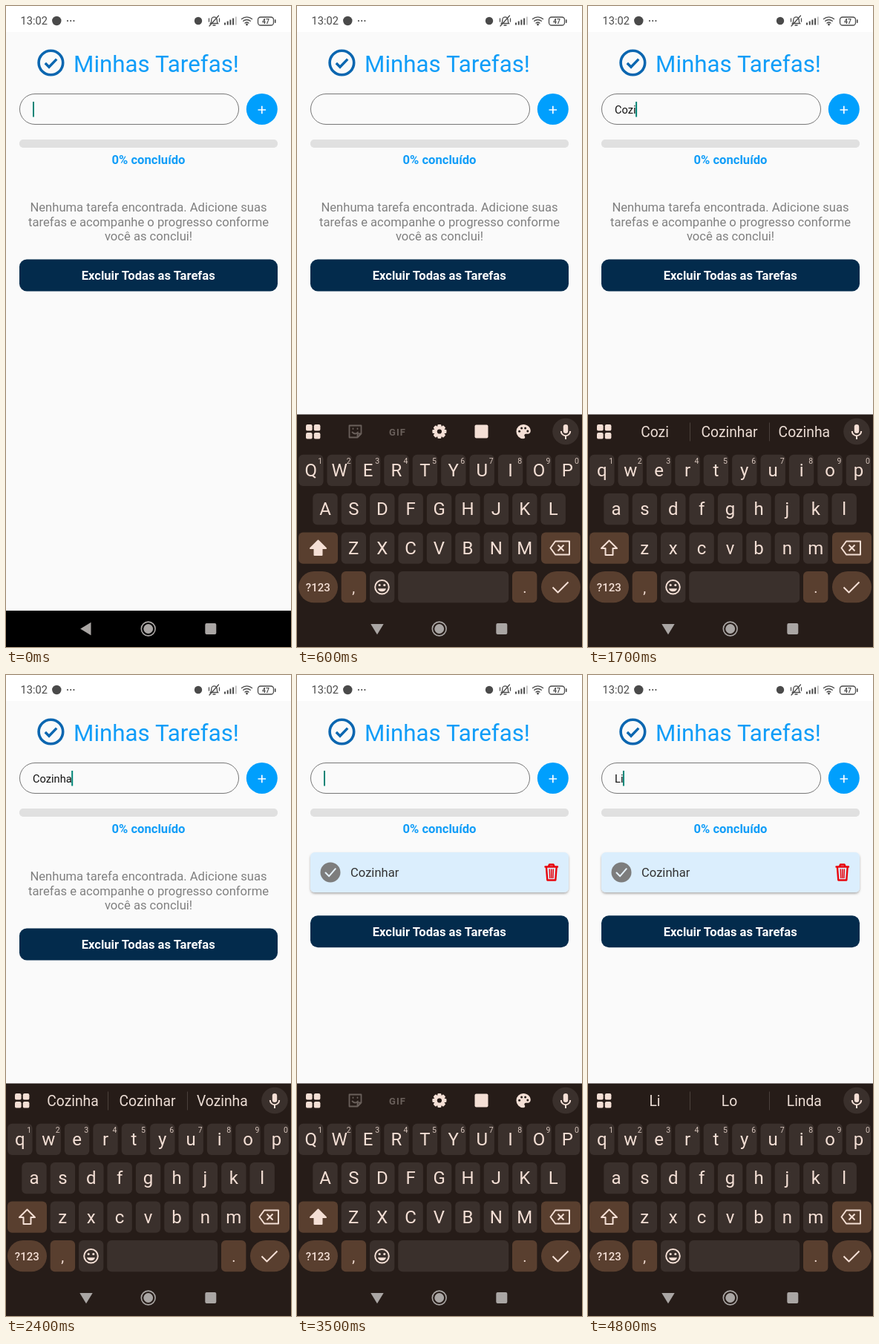
Write an HTML page that moves like this. It is 384x864 px and loops after 5 s.

```html
<!DOCTYPE html>
<html lang="pt-BR">
<head>
<meta charset="utf-8">
<title>Minhas Tarefas</title>
<style>
  html, body { margin: 0; width: 100%; height: 100%; overflow: hidden; background: #fafafa; }
  svg { display: block; width: 100vw; height: 100vh; }
  text { font-family: Roboto, sans-serif; white-space: pre; }
  .mid { text-anchor: middle; }
  .body { font-size: 16.6px; }
  .bold { font-weight: 700; }
  .line { fill: none; stroke-linecap: round; stroke-linejoin: round; }
  .key { fill: #3a302c; }
  .accent { fill: #593f2f; }
  .ink { fill: #f4dfd5; }
  .inkLine { fill: none; stroke: #f4dfd5; stroke-width: 2; stroke-linejoin: round; }
  .letter { font-size: 24px; }
  .digit { font-size: 10.5px; fill: #d5c3ba; }
  .word { font-size: 19.3px; fill: #ecddd5; }
  .dim { fill: #6a605b; }
  .status { fill: #4a4a4a; }
  .statusLine { fill: none; stroke: #4a4a4a; stroke-width: 1.3; stroke-linecap: round; }
</style>
</head>
<body>
<svg viewBox="0 0 384 864" preserveAspectRatio="none">
  <defs>
    <filter id="shade" x="-5%" y="-20%" width="110%" height="150%">
      <feDropShadow dx="0" dy="1.8" stdDeviation="1.6" flood-opacity=".3"/>
    </filter>
  </defs>
  <rect width="384" height="864" fill="#fafafa"/>
  <rect width="384" height="35" fill="#fff"/>

  <!-- status bar -->
  <g class="status">
    <text x="19.5" y="25.3" font-size="14.6">13:02</text>
    <circle cx="68.3" cy="20" r="6.2"/>
    <circle cx="83" cy="20" r="1.1"/><circle cx="87.2" cy="20" r="1.1"/><circle cx="91.4" cy="20" r="1.1"/>
    <circle cx="259" cy="20" r="5.2"/>
    <path class="statusLine" d="M275.5 23.5c1.4-1.4 1.2-3 1.3-5a3.7 3.7 0 0 1 7.4 0c.1 2 0 3.600 1.300 5zM279 26h3M274 27l12.500-14M273.500 17v4M287.500 17v4"/>
    <path d="M294 22.500h2v3h-2zM297.700 20.500h2v5h-2zM301.400 18.500h2v7h-2zM305.100 16.500h2v9h-2z"/>
    <path d="M308.800 14.500h2v11h-2z" opacity=".35"/>
    <path class="statusLine" stroke-width="1.8" d="M317.500 17.500a10.500 10.500 0 0 1 14 0M319.700 20.300a7.300 7.300 0 0 1 9.600 0M322 23a4 4 0 0 1 5 0"/>
    <circle cx="324.500" cy="25" r="1.400"/>
    <rect class="statusLine" x="339.500" y="15" width="21" height="11" rx="3.500"/>
    <rect x="362" y="18" width="1.600" height="5" rx=".8"/>
    <text class="mid bold" x="350" y="23.600" font-size="8.600">47</text>
  </g>

  <!-- header -->
  <g class="line" stroke="#0b66b0">
    <circle cx="60.400" cy="76.500" r="16.300" stroke-width="3.600"/>
    <path d="M52.800 77l5.200 5.200 10.200-10.600" stroke-width="3.400" stroke-linecap="butt" stroke-linejoin="miter"/>
  </g>
  <text class="mid" x="202.500" y="89" font-size="31.300" fill="#109df8">Minhas Tarefas!</text>

  <!-- input -->
  <rect x="18.500" y="118.500" width="295" height="41" rx="20.500" fill="#fafafa" stroke="#777"/>
  <text id="typed" x="36" y="145" font-size="14.650" fill="#111"></text>
  <rect id="caret" y="129" width="2" height="20.500" fill="#008577"/>
  <g id="plus">
    <circle cx="344.800" cy="139" r="21" fill="#009ffd"/>
    <path d="M339.500 140h10.600M344.800 134.700v10.600" stroke="#fff" stroke-width="1.700"/>
  </g>

  <rect x="18" y="180" width="348" height="11" rx="5" fill="#e0e0e0"/>
  <text class="mid body bold" x="192" y="213.300" fill="#109df8">0% concluído</text>

  <!-- list -->
  <g id="empty" class="mid body" fill="#808080">
    <text x="192" y="277.300">Nenhuma tarefa encontrada. Adicione suas</text>
    <text x="192" y="296.800">tarefas e acompanhe o progresso conforme</text>
    <text x="192" y="316.300">você as conclui!</text>
  </g>
  <g id="task">
    <rect x="18" y="239" width="348" height="54" rx="6" fill="#dbeefd" filter="url(#shade)"/>
    <circle cx="45" cy="266" r="13.500" fill="#7d7d7d"/>
    <path class="line" d="M38.500 266.500l4.700 4.700 8.600-10" stroke="#e6f2fc" stroke-width="2"/>
    <text class="body" x="72" y="272.300" fill="#333">Cozinhar</text>
    <g class="line" stroke="#e8050c" stroke-width="2">
      <path d="M334.500 258.500h16.500M339 258l1-2.500h5.500l1 2.500M336 260l1.300 16.500h11l1.300-16.500" stroke-width="2.400"/>
      <path d="M340.300 262l.4 11.500M342.800 262v11.500M345.300 262l-.4 11.500" stroke-width="1.500"/>
    </g>
  </g>
  <g id="clear">
    <rect x="18" y="341.500" width="348" height="43" rx="10" fill="#032b4c"/>
    <text class="mid body bold" x="191.700" y="369.300" fill="#fff">Excluir Todas as Tarefas</text>
  </g>

  <rect y="815" width="384" height="49" fill="#000"/>

  <!-- keyboard -->
  <g id="board">
    <rect y="550.500" width="384" height="314" fill="#261c18"/>
    <g class="ink">
      <rect x="12" y="564" width="8.600" height="8.600" rx="2.200"/><rect x="22.800" y="564" width="8.600" height="8.600" rx="2.200"/>
      <rect x="12" y="575" width="8.600" height="8.600" rx="2.200"/><rect x="22.800" y="575" width="8.600" height="8.600" rx="2.200"/>
    </g>
    <circle class="key" cx="362" cy="573.500" r="17.800"/>
    <rect class="ink" x="358.800" y="564" width="6.400" height="12" rx="3.200"/>
    <path class="inkLine" d="M355.800 573a6.200 6.200 0 0 0 12.400 0M362 579.500v4.500"/>

    <g id="tools">
      <g class="line" stroke="#6a605b" stroke-width="1.800">
        <path d="M70.500 565.500h16v11l-5 5h-11zM86.500 576.500h-5v5M74.500 574.500q4 4 7.500 0"/>
        <path d="M75.500 569.500v.5M81.500 569.500v.5"/>
      </g>
      <text class="mid bold dim" x="135.500" y="578.500" font-size="13" letter-spacing="1">GIF</text>
      <g id="gear" class="ink"></g>
      <rect class="ink" x="239.500" y="564.500" width="18" height="18" rx="2"/>
      <path class="ink" d="M305 564a9.600 9.600 0 0 0 0 19.200c2.600 0 2.600-2 1.600-3.400-.9-1.600.2-3 1.800-3h2.600c2.200 0 3.800-1.800 3.800-4 0-5-4.600-8.800-9.800-8.800z"/>
      <g fill="#261c18">
        <circle cx="299.600" cy="573.300" r="1.500"/><circle cx="302.600" cy="569" r="1.500"/>
        <circle cx="307.600" cy="569" r="1.500"/><circle cx="310.800" cy="573" r="1.500"/>
      </g>
    </g>
    <g id="words">
      <rect id="tap" class="key" x="140" y="555" width="102" height="37" rx="8"/>
      <path d="M137.500 561.500v25M244.500 561.500v25" stroke="#4b413c"/>
      <text class="mid word" x="90" y="580.500"></text>
      <text class="mid word" x="190.500" y="580.500"></text>
      <text class="mid word" x="291.300" y="580.500"></text>
    </g>

    <g id="keys"></g>

    <path id="shift" class="inkLine" d="M28.500 720.500l10.500 10.500h-5.500v9h-10v-9h-5.500z"/>
    <path class="inkLine" d="M348 721.500h19v18h-19l-6.500-9zM351.500 726.500l8 8M359.500 726.500l-8 8"/>
    <text class="mid ink" x="28.300" y="788.500" font-size="15" font-weight="500">?123</text>
    <text class="mid ink" x="76.300" y="791" font-size="20">,</text>
    <text class="mid ink" x="306.800" y="791" font-size="20">.</text>
    <circle class="inkLine" cx="114.500" cy="783.300" r="9.300"/>
    <circle class="ink" cx="111.200" cy="780.500" r="1.600"/><circle class="ink" cx="117.800" cy="780.500" r="1.600"/>
    <path class="ink" d="M109 785.300h11a5.600 5 0 0 1-11 0z"/>
    <path class="inkLine" d="M344.500 783.500l7 7 14-14"/>
    <g id="popup">
      <rect width="50" height="50" rx="9" fill="#574943"/>
      <text class="mid ink" x="25" y="35" font-size="29"></text>
    </g>
  </g>

  <!-- navigation -->
  <g fill="#aaa6a4">
    <path id="back" d="M100.200 839.500l14.300-8.700v17.400z"/>
    <circle cx="191.700" cy="839.500" r="9.400" fill="none" stroke="#aaa6a4" stroke-width="1.600"/>
    <circle cx="191.700" cy="839.500" r="6.400"/>
    <rect x="268.300" y="832" width="15" height="15" rx="2"/>
  </g>
</svg>
<script>
const LOOP = 5000;
const $ = id => document.getElementById(id);

function add(parent, tag, attrs, label = '') {
  const el = document.createElementNS('http://www.w3.org/2000/svg', tag);
  for (const name in attrs) el.setAttribute(name, attrs[name]);
  el.textContent = label;
  return parent.appendChild(el);
}
const show = (el, on) => el.setAttribute('visibility', on ? 'visible' : 'hidden');

// keyboard
const keys = {};
const addKey = (x, y, width, cls = 'key', rx = 6) =>
  add($('keys'), 'rect', { x, y, width, height: 42.3, rx, class: cls });

[['qwertyuiop', 18.800, 604.700], ['asdfghjkl', 38, 657], ['zxcvbnm', 76.300, 709.500]]
  .forEach(([row, left, y], r) => [...row].forEach((ch, i) => {
    const x = left + i * 38.400;
    addKey(x - 16.700, y, 33.400);
    const label = add($('keys'), 'text', { x, y: y + 29, class: 'mid ink letter' }, ch);
    if (!r) add($('keys'), 'text', { x: x + 12.500, y: y + 12, class: 'mid digit' }, (i + 1) % 10);
    keys[ch] = { x, y, label };
  }));
addKey(2, 709.500, 53, 'accent');
addKey(329, 709.500, 53, 'accent');
addKey(2, 762, 53, 'accent', 21);
addKey(59.700, 762, 33.400, 'accent');
addKey(98, 762, 33.400);
addKey(136.200, 762, 149);
addKey(290, 762, 33.400, 'accent');
addKey(329, 762, 53, 'accent', 21);

// gear: eight teeth around a ring
for (let i = 0; i < 4; i++)
  add($('gear'), 'rect', { x: 189.400, y: 564, width: 5, height: 19, rx: 1.200, transform: `rotate(${i * 45} 191.900 573.500)` });
add($('gear'), 'circle', { cx: 191.900, cy: 573.500, r: 7.400 });
add($('gear'), 'circle', { cx: 191.900, cy: 573.500, r: 3.100, fill: '#261c18' });

// time, typed text, suggestions (none: toolbar and capitals), pressed key
const steps = [
  [0, '', ''],
  [1000, '', '', 'c'],
  [1100, 'C', 'C,Com,Como'],
  [1200, 'C', 'C,Com,Como', 'o'],
  [1300, 'Co', 'Co,Com,Como'],
  [1400, 'Co', 'Co,Com,Como', 'z'],
  [1500, 'Coz', 'Coz,Cozinha,Cozinhar'],
  [1600, 'Coz', 'Coz,Cozinha,Cozinhar', 'i'],
  [1700, 'Cozi', 'Cozi,Cozinhar,Cozinha'],
  [1900, 'Cozi', 'Cozi,Cozinhar,Cozinha', 'n'],
  [2000, 'Cozin', 'Cozin,Cozinha,Cozinhar'],
  [2100, 'Cozin', 'Cozin,Cozinha,Cozinhar', 'h'],
  [2200, 'Cozinh', 'Cozinh,Cozinha,Cozinhar'],
  [2300, 'Cozinh', 'Cozinh,Cozinha,Cozinhar', 'a'],
  [2400, 'Cozinha', 'Cozinha,Cozinhar,Vozinha'],
  [2700, 'Cozinhar ', 'e,com,o'],
  [3300, '', ''],
  [4400, '', '', 'l'],
  [4500, 'L', 'L,Lo,La'],
  [4600, 'L', 'L,Lo,La', 'i'],
  [4800, 'Li', 'Li,Lo,Linda']
];
const caretOff = [[600, 1000], [3200, 3300], [3900, 4400]];
const wordEls = document.querySelectorAll('.word');
const within = (t, [from, to]) => t >= from && t < to;
let last = -1;

function draw(t) {
  const [, text, words, press] = steps.findLast(s => s[0] <= t);
  const caps = !words;

  // the board decelerates into place
  const rise = t < 100 ? 320 : t < 500 ? 150 * Math.exp(-(t - 100) / 69) : 0;
  $('board').setAttribute('transform', `translate(0 ${Math.round(rise)})`);
  const turn = 90 * Math.min(1, Math.max(0, (t - 130) / 250));
  $('back').setAttribute('transform', `rotate(${-turn} 108 839.500)`);

  $('typed').textContent = text;
  $('caret').setAttribute('x', 36 + (text ? $('typed').getComputedTextLength() - .5 : 0));
  show($('caret'), !caretOff.some(span => within(t, span)));

  show($('tools'), caps);
  show($('words'), !caps);
  show($('tap'), within(t, [2600, 2700]));
  words.split(',').forEach((w, i) => wordEls[i].textContent = w);
  for (const ch in keys) keys[ch].label.textContent = caps ? ch.toUpperCase() : ch;
  $('shift').style.fill = caps ? '#f4dfd5' : 'none';

  show($('popup'), press);
  if (press) {
    const { x, y } = keys[press];
    $('popup').setAttribute('transform', `translate(${x - 25} ${y - 52})`);
    $('popup').lastElementChild.textContent = caps ? press.toUpperCase() : press;
  }

  const added = t >= 3300;
  show($('task'), added);
  show($('empty'), !added);
  $('clear').setAttribute('transform', `translate(0 ${added ? -17.300 : 0})`);
  $('plus').setAttribute('opacity', within(t, [3200, 3300]) ? .4 : 1);
}

const start = performance.now();
function tick() {
  const t = Math.floor((performance.now() - start) % LOOP / 100) * 100;
  if (t !== last) draw(last = t);
  requestAnimationFrame(tick);
}
tick();
</script>
</body>
</html>
```
